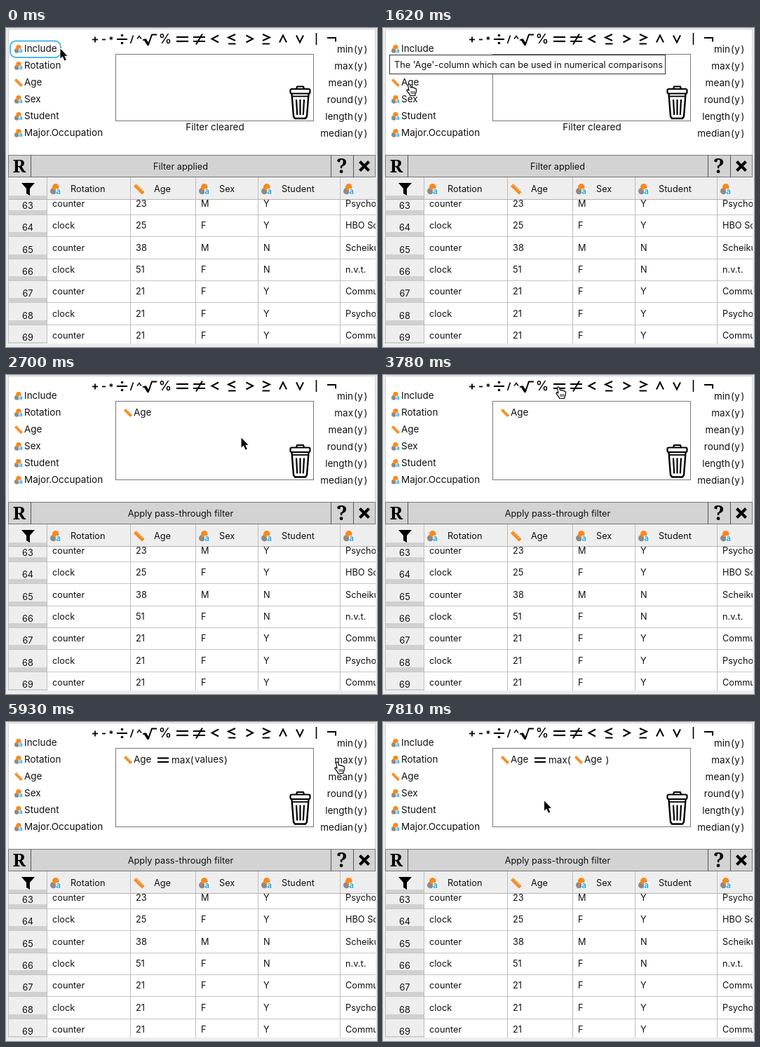
Animation, 529 px wide and 455 px high, one loop 8000 ms. Source, as an HTML page with a canvas:

```html
<!DOCTYPE html>
<html lang="en">
<head>
<meta charset="utf-8">
<title>Filter builder</title>
<style>
html, body { margin: 0; width: 100%; height: 100%; overflow: hidden; background: #ededed; }
canvas { display: block; width: 529px; height: 455px; }
</style>
</head>
<body>
<canvas id="stage"></canvas>
<script>
const W = 529, H = 455, LOOP = 8000;
const canvas = document.getElementById('stage');
const ctx = canvas.getContext('2d');
const ratio = window.devicePixelRatio || 1;
canvas.width = W * ratio;
canvas.height = H * ratio;

const SANS = 'Inter, "Noto Sans", sans-serif';
const UI = '12.75px ' + SANS;
const LARGE = '13.5px ' + SANS;
const ORANGE = '#f58a1f', BLUE = '#2aa9e0', INK = '#111';

const columns = ['Include', 'Rotation', 'Age', 'Sex', 'Student', 'Major.Occupation'];
const functions = ['min', 'max', 'mean', 'round', 'length', 'median'];
const headers = [['Rotation', 58], ['Age', 177], ['Sex', 270], ['Student', 359], ['', 476]];
const rows = [
  ['counter', '23', 'M', 'Y', 'Psychologie'],
  ['clock', '25', 'F', 'Y', 'HBO Sociaal'],
  ['counter', '38', 'M', 'N', 'Scheikunde'],
  ['clock', '51', 'F', 'N', 'n.v.t.'],
  ['counter', '21', 'F', 'Y', 'Communicatie'],
  ['clock', '21', 'F', 'Y', 'Psychologie'],
  ['counter', '21', 'F', 'Y', 'Communicatie']
];

// Hover outlines: x, y, width, height
const outlines = {
  include: [6, 18.5, 72, 23.5],
  rotation: [6, 42.5, 80, 23.5],
  age: [6, 66.5, 52, 23.5],
  equals: [239, 3, 25, 26],
  max: [467, 42.5, 51.5, 23.5]
};

// Start time, pointer shape, pointer x, pointer y, hover outline
const moves = [
  [0, 'arrow', 77, 29, 'include'],
  [270, 'arrow', 66, 47, 'rotation'],
  [540, 'hand', 40, 85, 'age'],
  [810, 'hand', 33, 79, 'age'],
  [1620, 'hand', 33, 79, ''],
  [2160, 'arrow', 105, 104, ''],
  [2430, 'arrow', 240, 103, ''],
  [2700, 'arrow', 335, 89, ''],
  [2970, 'arrow', 290, 48, ''],
  [3240, 'hand', 250, 15, 'equals'],
  [3510, 'hand', 246, 16, 'equals'],
  [3780, 'hand', 246, 16, ''],
  [4320, 'arrow', 320, 42, ''],
  [4590, 'arrow', 420, 62, ''],
  [4860, 'hand', 474, 60, 'max'],
  [5130, 'hand', 468, 56, 'max'],
  [5660, 'hand', 468, 56, ''],
  [6200, 'arrow', 330, 78, ''],
  [6470, 'arrow', 140, 85, ''],
  [6730, 'hand', 27, 80, 'age'],
  [7270, 'hand', 27, 80, ''],
  [7810, 'arrow', 229.5, 112, '']
];

function rect(x, y, w, h, color) {
  ctx.fillStyle = color;
  ctx.fillRect(x, y, w, h);
}

function frame(x, y, w, h, color, width = 1) {
  ctx.strokeStyle = color;
  ctx.lineWidth = width;
  ctx.strokeRect(x, y, w, h);
}

function text(str, x, y, font = UI, align = 'left', color = INK) {
  ctx.font = font;
  ctx.textAlign = align;
  ctx.fillStyle = color;
  ctx.fillText(str, x, y);
}

// Each path is a flat list of x, y pairs
function trace(points) {
  ctx.beginPath();
  for (let i = 0; i < points.length; i += 2) ctx.lineTo(points[i], points[i + 1]);
}

function line(points, width = 2, color = '#000') {
  trace(points);
  ctx.strokeStyle = color;
  ctx.lineWidth = width;
  ctx.stroke();
}

function fill(points, color) {
  trace(points);
  ctx.closePath();
  ctx.fillStyle = color;
  ctx.fill();
}

function dot(x, y, r, color) {
  ctx.beginPath();
  ctx.arc(x, y, r, 0, Math.PI * 2);
  ctx.fillStyle = color;
  ctx.fill();
}

function at(x, y, scale, draw) {
  ctx.save();
  ctx.translate(x, y);
  ctx.scale(scale, scale);
  draw();
  ctx.restore();
}

function nominal(x, y, scale = 1) {
  at(x, y, scale, () => {
    dot(3.5, 8.2, 3.5, '#8b8b8b');
    dot(6, 3.7, 3.7, ORANGE);
    rect(6.2, 5.6, 5.6, 6.4, '#fff');
    text('a', 9, 11.2, 'bold 9px ' + SANS, 'center', BLUE);
  });
}

function ruler(x, y, scale = 1) {
  at(x, y, scale, () => {
    fill([0, 2.8, 2.8, 0, 12, 9.2, 9.2, 12], ORANGE);
    for (let i = 0; i < 4; i++) {
      const p = 3.6 + i * 2;
      line([p, p - 2.6, p - 1.2, p - 1.4], 0.7, '#fff0d8');
    }
  });
}

function operators() {
  line([123, 16.5, 131, 16.5], 1.8);
  line([127, 12.5, 127, 20.5], 1.8);
  line([137, 16.5, 142, 16.5], 1.8);
  text('*', 150, 21.5, 'bold 13px ' + SANS, 'center', '#000');
  line([158, 16, 173, 16]);
  dot(165.5, 10.5, 1.8, '#000');
  dot(165.5, 21.5, 1.8, '#000');
  line([177.5, 22, 181.5, 10.5], 1.6);
  line([187, 15.5, 190, 11.5, 193, 15.5], 1.4);
  line([195, 17.5, 198, 16], 1.5);
  line([198, 16, 203, 24], 3.6);
  line([202.5, 25, 208, 9.5, 215, 9.5], 2);
  text('%', 227, 22, '500 18.5px ' + SANS, 'center', '#000');
  line([243, 13, 260, 13], 2.2);
  line([243, 19, 260, 19], 2.2);
  line([267, 13, 284, 13]);
  line([267, 19, 284, 19]);
  line([271, 23.5, 280, 8.5]);
  line([303, 10.5, 293.5, 15.5, 303, 20.5]);
  line([327, 9, 317, 13.5, 327, 18]);
  line([317, 22.5, 327.5, 22.5]);
  line([342.5, 10.5, 352, 15.5, 342.5, 20.5]);
  line([366, 9, 376, 13.5, 366, 18]);
  line([365.5, 22.5, 376, 22.5]);
  line([390, 20.5, 395, 10.5, 400, 20.5]);
  line([414, 10.5, 419, 20.5, 424, 10.5]);
  line([442.5, 7, 442.5, 24], 1.6);
  line([458, 14, 470, 14, 470, 19.5]);
}

function trash(y) {
  at(404, y, 1, () => {
    ctx.lineJoin = 'round';
    line([10, 5, 11, 1.5, 20, 1.5, 21, 5], 2.2);
    ctx.beginPath();
    ctx.roundRect(1.5, 5, 28, 6.5, 2);
    ctx.lineWidth = 2.2;
    ctx.stroke();
    line([3.5, 12, 6, 44, 8, 47, 23, 47, 25, 44, 27.5, 12], 2.4);
    line([5, 15.5, 26, 15.5], 1.8);
    line([10, 20, 11.2, 42], 2.2);
    line([15.5, 20, 15.5, 42], 2.2);
    line([21, 20, 19.8, 42], 2.2);
    ctx.lineJoin = 'miter';
  });
}

function outline(name) {
  if (!name) return;
  ctx.beginPath();
  ctx.roundRect(...outlines[name], 8);
  ctx.strokeStyle = '#4bb7e8';
  ctx.lineWidth = 2;
  ctx.stroke();
}

function lists() {
  columns.forEach((name, i) => {
    const y = 34 + i * 24;
    (name === 'Age' ? ruler : nominal)(12, y - 10);
    text(name, 26, y, LARGE);
  });
  functions.forEach((name, i) => {
    const y = 35 + i * 24;
    text(name, 495, y, LARGE, 'right');
    text('(', 496, y, LARGE);
    text('y', 505, y, LARGE, 'center');
    text(')', 515.5, y, LARGE, 'right');
  });
}

function formula(t) {
  const empty = t < 1890;
  const height = empty ? 95 : 112;
  frame(156.5, 37.5, 282, height, '#777');
  trash(empty ? 82 : 98.5);
  if (empty) {
    text('Filter cleared', 298, 146, LARGE, 'center');
    return;
  }
  ruler(168, 48);
  text('Age', 182, 58, LARGE);
  if (t < 4050) return;
  line([216, 51.5, 232, 51.5], 2.2);
  line([216, 57, 232, 57], 2.2);
  if (t < 5930) {
    text('...', 236, 58, LARGE);
    return;
  }
  text('max(', 236, 59, LARGE);
  if (t < 7540) {
    text('values', 269, 58, LARGE);
    text(')', 316, 59, LARGE, 'right');
  } else {
    ruler(273, 48);
    text('Age', 287, 58, LARGE);
    text(')', 322.5, 59, LARGE, 'right');
  }
}

function toolbar(t) {
  rect(3, 181, 524, 32, '#d3d3d3');
  frame(3.5, 181.5, 523, 31, '#777');
  for (const x of [35.5, 463.5, 495.5]) line([x, 181, x, 213], 1, '#555');
  text('R', 19, 206, '900 26px "Noto Serif", serif', 'center', '#000');
  text(t < 1890 ? 'Filter applied' : 'Apply pass-through filter', 249, 201.5, UI, 'center');
  text('?', 479, 206.5, '900 28px "Noto Serif", serif', 'center', '#000');
  line([504.5, 190.5, 517.5, 203.5], 4);
  line([517.5, 190.5, 504.5, 203.5], 4);
}

function table() {
  rect(3, 213, 524, 237, '#fff');
  ctx.save();
  ctx.beginPath();
  ctx.rect(3, 213, 524, 237);
  ctx.clip();
  rect(3, 244, 55, 206, '#eeeeee');
  rows.forEach((row, i) => {
    const y = 255 + i * 31.3;
    const edge = Math.round(y + 11) + 0.5;
    rect(3, edge - 6.5, 55, 6, '#d0d0d0');
    line([3, edge, 527, edge], 1, '#c6c6c6');
    text(String(63 + i), 31, y + 3, UI, 'center');
    row.forEach((cell, j) => text(cell, headers[j][1] + 8, y));
  });
  rect(3, 213, 524, 31, '#eeeeee');
  rect(3, 239, 55, 5, '#d0d0d0');
  line([3, 244.5, 527, 244.5], 1, '#b4b4b4');
  headers.forEach(([name, x]) => {
    line([x + 0.5, 213, x + 0.5, 450], 1, '#bdbdbd');
    (name === 'Age' ? ruler : nominal)(x + 5, 222, 1.3);
    text(name, x + 34, 234);
  });
  fill([22, 221, 41, 221, 34, 229, 34, 239, 29, 236, 29, 229], '#000');
  ctx.restore();
  line([3.5, 213, 3.5, 450], 1, '#c0c0c0');
}

function tooltip() {
  rect(9, 38, 394, 27, '#fff');
  frame(9.5, 38.5, 393, 27, '#333');
  text("The 'Age'-column which can be used in numerical comparisons", 16, 56.5);
}

function pointer(kind, x, y) {
  at(x, y, 1, () => {
    ctx.lineJoin = 'round';
    if (kind === 'arrow') {
      const shape = [0.5, 0.5, 0.5, 14.5, 3.8, 11.5, 6.4, 17.5, 8.8, 16.5, 6.3, 10.8, 10.5, 10.8];
      trace(shape);
      ctx.closePath();
      ctx.strokeStyle = '#fff';
      ctx.lineWidth = 1.8;
      ctx.stroke();
      fill(shape, '#000');
    } else {
      ctx.beginPath();
      ctx.moveTo(4, 10);
      ctx.lineTo(2.7, 3);
      ctx.quadraticCurveTo(2.8, 0.7, 4.4, 1);
      ctx.quadraticCurveTo(5.6, 1.3, 6.6, 6);
      ctx.quadraticCurveTo(8.5, 4.6, 9.4, 6.4);
      ctx.quadraticCurveTo(11.4, 5.2, 12.2, 7.2);
      ctx.quadraticCurveTo(14.6, 6.6, 14.5, 9.5);
      ctx.quadraticCurveTo(14.6, 13, 13, 15);
      ctx.lineTo(12.8, 17.5);
      ctx.lineTo(5.8, 17.5);
      ctx.quadraticCurveTo(4.8, 14.5, 1.4, 11.2);
      ctx.quadraticCurveTo(0.3, 9.2, 2, 8.8);
      ctx.closePath();
      ctx.fillStyle = '#fff';
      ctx.fill();
      ctx.strokeStyle = '#000';
      ctx.lineWidth = 1.2;
      ctx.stroke();
      for (const fx of [7.2, 9.4, 11.6]) line([fx, 11, fx, 15], 0.9);
    }
    ctx.lineJoin = 'miter';
  });
}

function render(t) {
  const [, kind, x, y, hover] = moves.findLast(move => move[0] <= t);
  ctx.setTransform(ratio, 0, 0, ratio, 0, 0);
  rect(0, 0, W, H, '#ededed');
  rect(3, 1, 524, 180, '#fff');
  frame(3.5, 1.5, 523, 180, '#d0d0d0');
  operators();
  lists();
  formula(t);
  outline(hover);
  toolbar(t);
  table();
  if (t >= 1350 && t < 1890) tooltip();
  pointer(kind, x, y);
}

const start = performance.now();
function tick() {
  render((performance.now() - start) % LOOP);
  requestAnimationFrame(tick);
}
tick();
</script>
</body>
</html>
```
